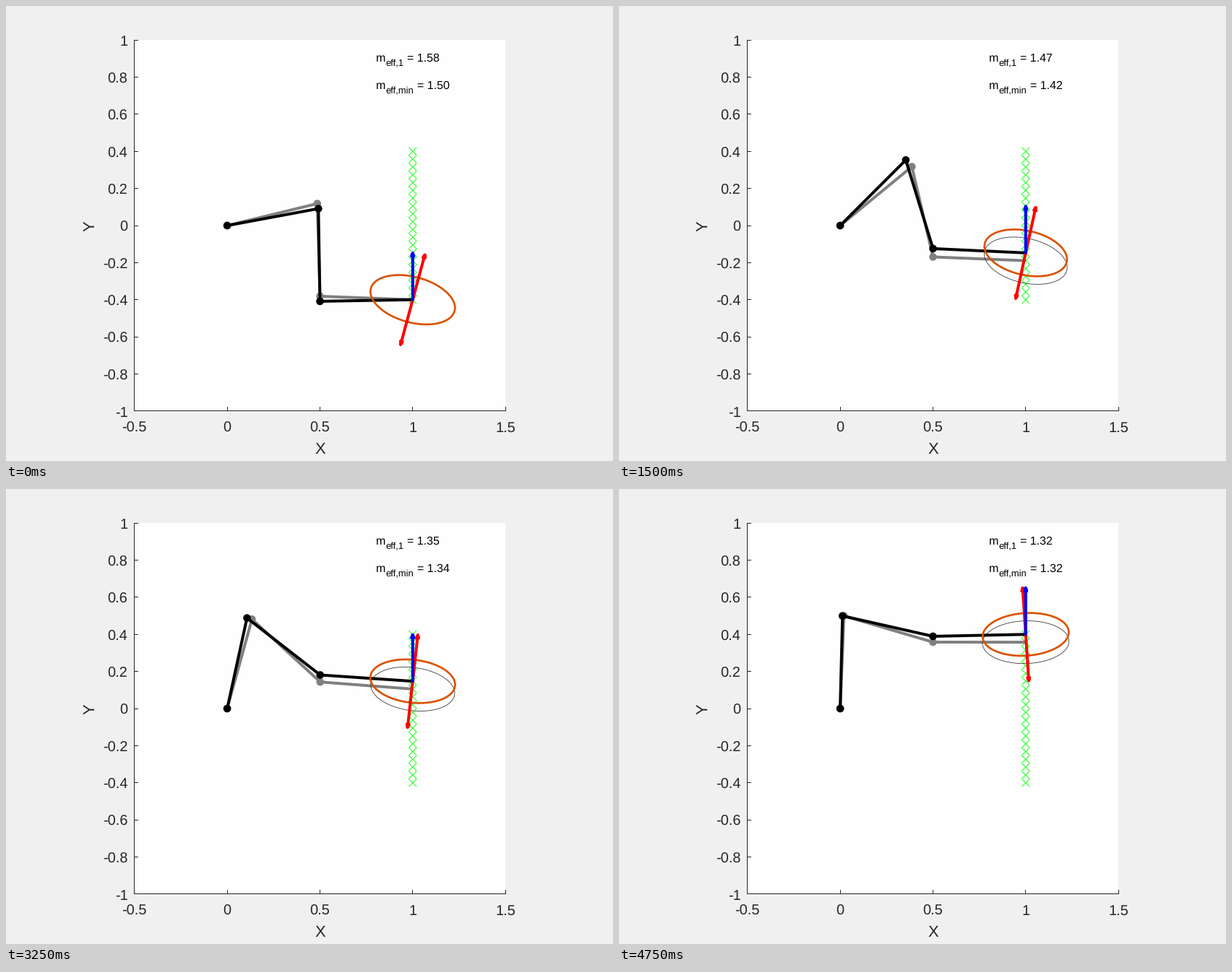
These frames come from a looping animation (840x630 px, 5 s). A matplotlib script:

```python
import numpy as np
import matplotlib.pyplot as plt
from matplotlib.animation import FuncAnimation
from matplotlib.patches import Circle, Rectangle

W, H, DPI = 840, 630, 100
PT = 72 / DPI                       # points per pixel
X0, Y0, UNIT = 306.1, 304.0, 256.725
STEPS, LINK, REACH = 20, 0.5, 0.25
START_RISE = 4.8 / UNIT             # wrist height above the hand before step 0
INK = "#262626"

plt.rcParams.update({"font.family": "Liberation Sans", "text.hinting": "none",
                     "path.snap": False, "path.simplify": False})
fig = plt.figure(figsize=(W / DPI, H / DPI), dpi=DPI, facecolor="#f0f0f0")
ax = fig.add_axes([0, 0, 1, 1])
ax.set_xlim(0, W)
ax.set_ylim(H, 0)
ax.axis("off")


def px(p):
    p = np.asarray(p, float)
    return X0 + UNIT * p[..., 0], Y0 - UNIT * p[..., 1]


def line(xs=(), ys=(), color=INK, width=1, z=2, **kw):
    kw.setdefault("solid_capstyle", "butt")
    return ax.plot(xs, ys, color=color, lw=width * PT, zorder=z, **kw)[0]


def label(x, y, s, size, color=INK, ha="left", **kw):
    return ax.text(x, y, s, fontsize=size * PT, color=color, ha=ha,
                   va="baseline", zorder=9, **kw)


def draw_axes():
    ax.add_patch(Rectangle((177, 47), 514, 514, fc="#fefefe", ec="none", zorder=0))
    line([177.5, 177.5], [47, 561])
    line([177, 692], [560.5, 560.5])
    for v in np.arange(-0.5, 2, 0.5):
        x = X0 + UNIT * v
        col = int(x - 0.1) + 0.5
        line([col, col], [555, 561])
        label(x, 590, f"{v:g}", 20, ha="center")
    for v in np.arange(-5, 6) / 5:
        y = Y0 - UNIT * v
        row = int(y) + 0.5
        line([177, 183], [row, row])
        label(168.5, y + 8, f"{v:g}", 20, ha="right")
    label(435, 620, "X", 22, ha="center")
    label(123, 304.5, "Y", 22, ha="center", rotation=90, rotation_mode="anchor")


def draw_targets():
    arm_len = 5.4
    for k in range(STEPS):
        x, y = px(hand(k))
        for slant in (-arm_len, arm_len):
            line([x - arm_len, x + arm_len], [y - slant, y + slant],
                 "#00ff00", 0.9)


def readout(y, sub, x_value):
    label(512, y, "m", 16, "black")
    label(525.3, y + 7, sub, 13, "black")
    return label(x_value, y, "", 16, "black")


class Arm:
    def __init__(self, color, z):
        self.links = line(color=color, width=4, z=z, solid_joinstyle="round")
        self.joints = [ax.add_patch(Circle((0, 0), 5.3, fc=color, ec="none", zorder=z))
                       for _ in range(3)]

    def pose(self, points):
        xs, ys = px(points)
        self.links.set_data(xs, ys)
        for joint, center in zip(self.joints, zip(xs, ys)):
            joint.center = center


def hand(k):
    return np.array([1.0, -0.4 + 0.8 * max(k, 0) / (STEPS - 1)])


def wrist_rise(k):
    if k < 0:
        return START_RISE
    s = k / (STEPS - 1)
    sway = 0.8 * np.cos(2 * np.pi * (k - 2.5) / 8.5)
    return (-2 + 30.4 * s - 31.8 * s**3 + sway) / UNIT


def arm_points(k):
    """Joint positions; the last link's slope fixes the other two."""
    tip, rise = hand(k), wrist_rise(k)
    wrist = tip + [-np.sqrt(LINK**2 - rise**2), rise]
    d = np.hypot(*wrist)
    bend = np.sqrt(LINK**2 - d**2 / 4)
    elbow = wrist / 2 + bend * np.array([-wrist[1], wrist[0]]) / d
    return np.array([(0, 0), elbow, wrist, tip])


def masses(k):
    """Tilt of the ellipse and the upward, least and greatest effective mass."""
    s = k / (STEPS - 1)
    tilt = np.radians(15.1 - 7.5 * s - 11.4 * s**3)
    drop = 0.263 - 0.0184 * k
    up = 1.317 + (drop + np.hypot(drop, 0.035)) / 2      # falls, then levels off
    most = 5.25 + 0.21 * np.cos(2 * np.pi * k / 17)
    least = np.cos(tilt)**2 / (1 / up - np.sin(tilt)**2 / most)
    return tilt, up, least, most


def ellipse(k):
    t, _, least, most = masses(k)
    a = np.linspace(0, 2 * np.pi, 121)[:, None]
    wide = np.sqrt(most) * np.array([np.cos(t), -np.sin(t)])
    thin = np.sqrt(least) * np.array([np.sin(t), np.cos(t)])
    return hand(k) + 0.1 * (np.cos(a) * wide + np.sin(a) * thin)


def arrow(base, u):
    u = np.asarray(u, float)
    side = 0.005 * np.array([-u[1], u[0]])
    tip = base + REACH * u
    back = tip - 0.016 * u
    return np.array([base, tip, back + side, tip, back - side, tip])


draw_axes()
draw_targets()
old_arm, new_arm = Arm("#808080", 3), Arm("black", 4)
old_ring = line(color="#303030", width=0.8, z=3.5)
new_ring = line(color="#d95300", width=2.7, z=5)
red_up, red_down, blue = (
    line(color=c, width=4, z=6, solid_capstyle="round", solid_joinstyle="round")
    for c in ("red", "red", "blue"))
up_text = readout(76.6, "eff,1", 555.2)
min_text = readout(114.6, "eff,min", 568.7)


def show(k):
    old_arm.pose(arm_points(k - 1))
    new_arm.pose(arm_points(k))
    old_ring.set_data(*px(ellipse(max(k - 1, 0))))
    old_ring.set_visible(k > 0)
    new_ring.set_data(*px(ellipse(k)))
    tilt, up, least, _ = masses(k)
    u = np.array([np.sin(tilt), np.cos(tilt)])
    for art, way in ((red_up, u), (red_down, -u), (blue, (0, 1))):
        art.set_data(*px(arrow(hand(k), way)))
    up_text.set_text(f"= {up:.2f}")
    min_text.set_text(f"= {least:.2f}")
    return ()


anim = FuncAnimation(fig, show, frames=STEPS, init_func=lambda: show(0),
                     interval=250, repeat=True, repeat_delay=0)
plt.show()
```
